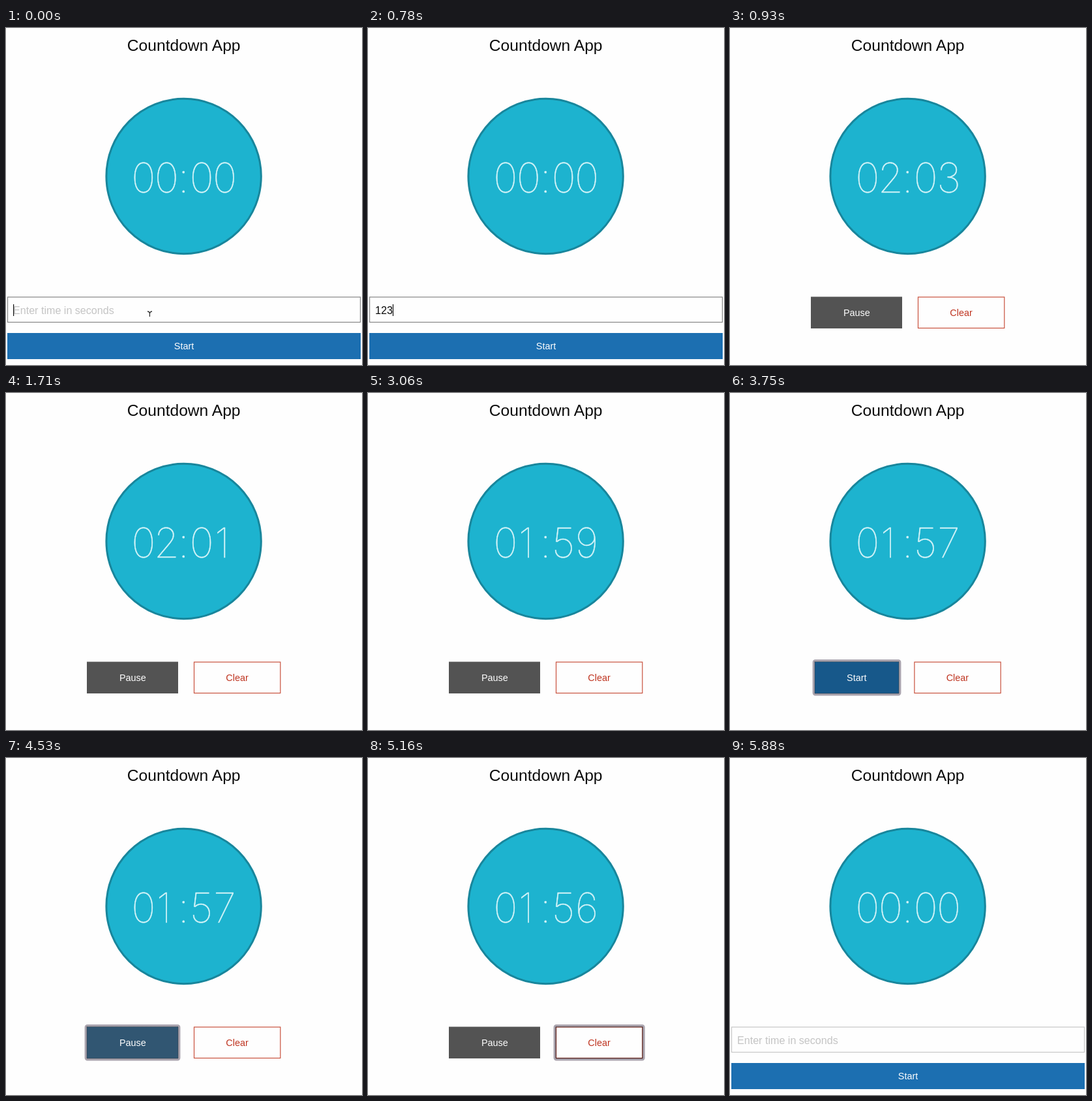
These frames come from a looping animation (546x516 px, 6.06 s). An HTML page:

```html
<!DOCTYPE html>
<html lang="en">
<head>
<meta charset="utf-8">
<title>Countdown App</title>
<style>
  html, body { margin: 0; width: 100%; height: 100%; overflow: hidden; background: #fefefe; }
  svg { display: block; width: 546px; height: 516px; font-family: "Liberation Sans", Arial, sans-serif; }
  text { text-anchor: middle; }
  .title { font-size: 24.6px; fill: #0a0a0a; }
  .label { font-size: 14.4px; fill: #fefefe; }
  .field { font-size: 16.1px; text-anchor: start; }
  .clock { font: 100 63px Inter, Roboto, sans-serif; fill: #d6f4f8; stroke: #d6f4f8; stroke-width: .5; }
  .glow { fill: none; stroke: #aaa4ae; stroke-width: 3.4; filter: blur(.6px); }
  .dots { fill: none; stroke: #30343c; stroke-dasharray: 1 1; }
</style>
</head>
<body>
<svg viewBox="0 0 546 516">
  <text class="title" x="272.7" y="35">Countdown App</text>
  <circle cx="272.6" cy="227" r="118.7" fill="#1db3cf" stroke="#18869c" stroke-width="3"/>
  <g class="clock" id="clock"></g>

  <g id="form">
    <rect id="input" x="2.5" y="412" width="541" height="38.5" fill="#fefefe" stroke-width="1.2"/>
    <text class="field" id="value" x="11" y="438"></text>
    <rect id="caret" y="423" width="1.2" height="18" fill="#111"/>
    <path id="beam" d="M217 434q3 0 3.4 3v5M224 434q-3 0-3.6 3" fill="none" stroke="#333" stroke-width="1.3"/>
    <rect x="2" y="467" width="542" height="40" fill="#1c6fb1"/>
    <text class="label" x="273" y="492">Start</text>
  </g>

  <g id="controls">
    <g id="ring">
      <rect class="glow" id="glow" y="409.8" height="52" rx="2.5"/>
    </g>
    <rect id="toggle" y="411.5" height="48.5"/>
    <text class="label" id="toggleText" x="194.3" y="441"></text>
    <g id="clear">
      <rect id="clearBox" x="288.5" y="412" width="132.3" height="47.5" fill="#fefefe" stroke-width="1.2"/>
      <text class="label" id="clearText" x="354.5" y="441">Clear</text>
    </g>
    <rect class="dots" id="dots" y="411.5" height="48.5"/>
  </g>
</svg>
<script>
  const LOOP = 6060, STEP = 30, FADE = 120;
  const TICKS = [1260, 1710, 2190, 2640, 3090, 3540, 4950, 5400];
  const KEYS = [60, 210, 360];
  const START = 810, FOCUS = 3240, PAUSE = 3630, RESUME = 4500, CLEAR = 5160, RESET = 5850;
  const GREY = [109, 109, 109], DARK = [83, 83, 83], BLUE = [23, 88, 138];
  const RED = [191, 52, 32], MAROON = [103, 37, 26];

  const $ = id => document.getElementById(id);
  const set = (id, attrs) => {
    for (const k in attrs) $(id).setAttribute(k, attrs[k]);
  };
  const show = (id, on) => set(id, { visibility: on ? "inherit" : "hidden" });
  const write = (id, text) => {
    if ($(id).textContent !== text) $(id).textContent = text;
  };

  // Colour fade with an ease-out curve
  function fade(t, from, a, b) {
    const p = Math.min(1, Math.max(0, (t - from) / FADE));
    const e = 1 - (1 - p) ** 2;
    return `rgb(${a.map((v, i) => Math.round(v + (b[i] - v) * e))})`;
  }

  const cells = [210.8, 246.4, 272.3, 300, 335.6].map(x => {
    const el = document.createElementNS("http://www.w3.org/2000/svg", "text");
    el.setAttribute("y", 251.5);
    $("clock").append(el);
    return { el, x };
  });

  function drawClock(sec) {
    const pad = n => String(n).padStart(2, "0");
    const text = pad(Math.floor(sec / 60)) + ":" + pad(sec % 60);
    cells.forEach(({ el, x }, i) => {
      if (el.textContent === text[i]) return;
      el.textContent = text[i];
      el.setAttribute("x", text[i] === "1" ? x - 4 : x);
    });
  }

  function drawForm(t) {
    const focused = t < START;
    const typed = focused ? KEYS.filter(k => t >= k).length : 0;
    write("value", typed ? "123".slice(0, typed) : "Enter time in seconds");
    set("value", { fill: typed ? "#0a0a0a" : "#c4c4c4" });
    set("input", { stroke: focused ? "#858585" : "#c6c6c6" });
    set("caret", { x: 11 + typed * 8.95 });
    show("caret", focused && !(t >= 540 && t < 780));
    show("beam", t < KEYS[0]);
  }

  function toggleColor(t) {
    if (t < PAUSE) return fade(t, START, GREY, DARK);
    if (t < RESUME) return fade(t, PAUSE, DARK, BLUE);
    if (t < CLEAR) return fade(t, RESUME, BLUE, DARK);
    return fade(t, CLEAR, DARK, GREY);
  }

  function drawControls(t) {
    const paused = t >= PAUSE && t < RESUME, clearing = t >= CLEAR;
    const box = paused ? { x: 130, width: 129 } : { x: 124, width: 140 };
    const target = clearing ? { x: 288, width: 133.3 } : box;
    set("toggle", { ...box, fill: toggleColor(t) });
    write("toggleText", paused ? "Start" : "Pause");
    set("clear", { transform: `translate(${paused ? -5.6 : 0} 0)` });
    set("clearBox", { stroke: clearing ? "#7a2418" : "#c8503c" });
    $("clearText").style.fill = fade(t, CLEAR, RED, MAROON);
    set("glow", { x: target.x - 1.7, width: target.width + 3.4 });
    set("dots", target);
    show("ring", t >= FOCUS);
    show("dots", t >= FOCUS);
  }

  function draw(now) {
    const t = Math.floor(now % LOOP / STEP) * STEP;
    const running = t >= START && t < RESET;
    drawClock(running ? 123 - TICKS.filter(k => t >= k).length : 0);
    show("form", !running);
    show("controls", running);
    if (running) drawControls(t);
    else drawForm(t);
  }

  const origin = performance.now();
  function loop() {
    draw(performance.now() - origin);
    requestAnimationFrame(loop);
  }
  loop();
</script>
</body>
</html>
```
